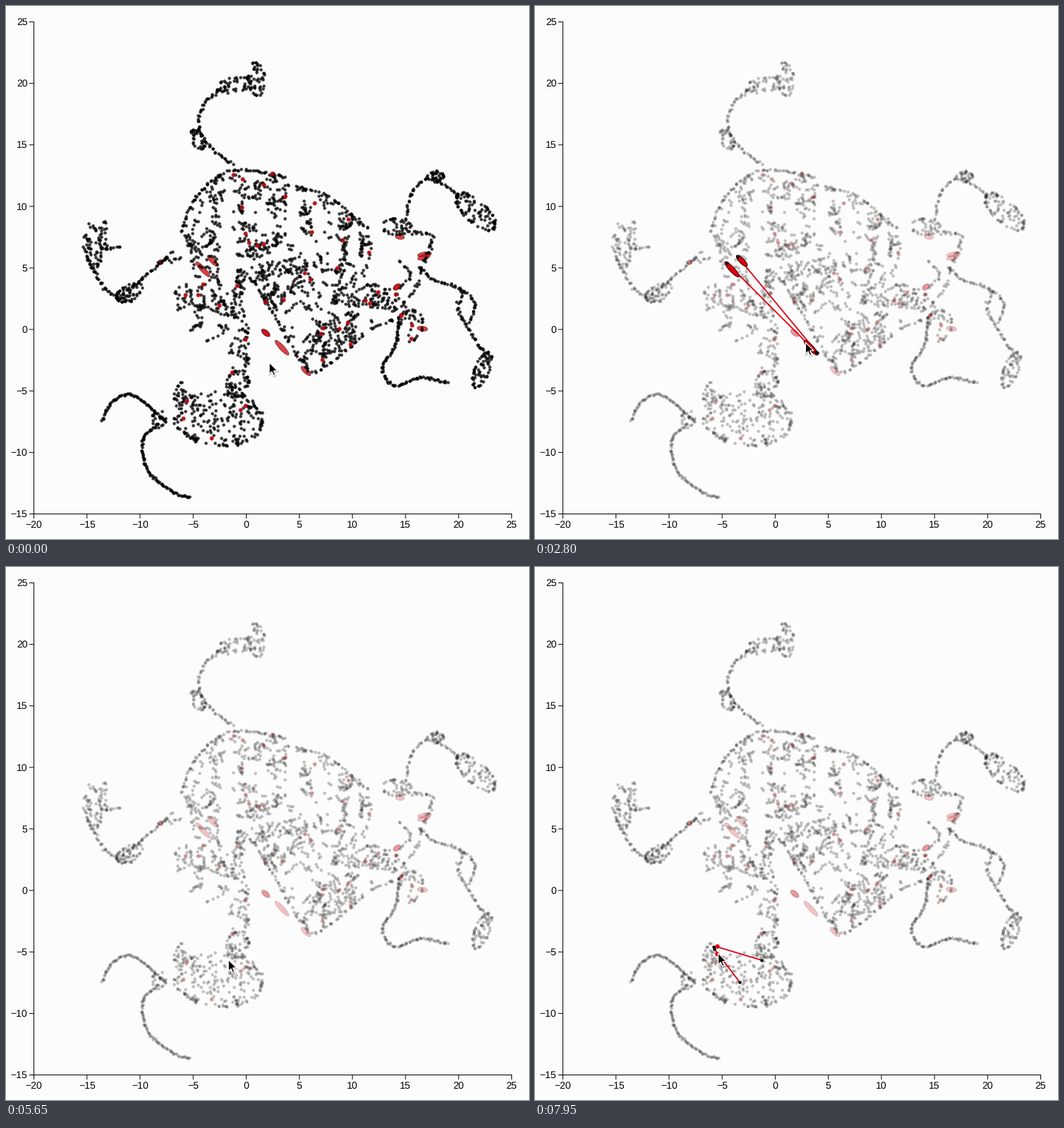
A matplotlib script that plays this animation: 741x755 px, repeating every 8000 ms.

```python
import numpy as np
import matplotlib.pyplot as plt
from matplotlib.animation import FuncAnimation
from matplotlib.patches import Ellipse, Polygon
from matplotlib.path import Path

W, H, DPI = 741, 755, 64
STEP, LOOP = 50, 8000
PX = 72 / DPI
RED, HOT = "#d00c12", "#dc0010"
rng = np.random.default_rng(5)
plt.rcParams.update({"font.family": "Liberation Sans", "text.hinting": "none"})

fig = plt.figure(figsize=(W / DPI, H / DPI), dpi=DPI, facecolor="#fcfcfc")
ax = fig.add_axes([0, 0, 1, 1])
ax.set(xlim=(0, W), ylim=(H, 0))
ax.axis("off")


# point cloud
def smooth(pts, n=16):
    """Catmull-Rom curve through the key points."""
    p = np.array(pts, float)
    q = np.vstack([2 * p[0] - p[1], p, 2 * p[-1] - p[-2]])
    u = np.linspace(0, 1, n)[:, None]
    return np.vstack([
        b + u / 2 * (c - a + u * (2 * a - 5 * b + 4 * c - d + u * (3 * (b - c) + d - a)))
        for a, b, c, d in zip(q, q[1:], q[2:], q[3:])])


def strand(*pts, gap=2.6, spread=0.9):
    """Dots strung along a curve."""
    p = smooth(pts)
    s = np.r_[0, np.cumsum(np.hypot(*np.diff(p, axis=0).T))]
    u = np.arange(0, s[-1], gap)
    u = np.clip(u + rng.normal(0, gap * 0.6, len(u)), 0, s[-1])
    xy = np.c_[np.interp(u, s, p[:, 0]), np.interp(u, s, p[:, 1])]
    return list(xy + rng.normal(0, spread, xy.shape))


def blob(n, cx, cy, rx, ry, tilt=0, rim=0.4):
    """Dots in a tilted ellipse, a share of them on its rim."""
    a = rng.uniform(0, 2 * np.pi, n)
    r = np.where(rng.random(n) < rim, rng.normal(1, 0.03, n), np.sqrt(rng.random(n)))
    z = (rx * r * np.cos(a) + 1j * ry * r * np.sin(a)) * np.exp(1j * np.radians(tilt))
    return list(np.c_[cx + z.real, cy + z.imag])


def chains(n, outline, holes):
    """Short wandering chains that fill an outline but keep out of the holes."""
    area, lo, hi = Path(outline), outline.min(0), outline.max(0)

    def inside(p):
        return area.contains_point(p) and all(
            ((p[0] - x) / rx) ** 2 + ((p[1] - y) / ry) ** 2 > 1 for x, y, rx, ry in holes)

    out = []
    while len(out) < n:
        p, a = rng.uniform(lo, hi), rng.uniform(0, 2 * np.pi)
        for _ in range(rng.integers(1, 6)):
            if inside(p):
                out.append(p)
            p = p + rng.uniform(2.5, 5.5) * np.array([np.cos(a), np.sin(a)])
            a += rng.normal(0, 0.7)
    return out


back = [(248, 318), (270, 269), (318, 233), (393, 240)]
shoulder = [(410, 254), (462, 273), (516, 319)]
keel = [(345, 384), (381, 440), (428, 515), (470, 497), (506, 465)]
leg = [(341, 380), (331, 420), (340, 465), (341, 516)]
flank = [(321, 520), (308, 470), (272, 474), (236, 410), (263, 384), (259, 345)]
edge = back + shoulder + [(515, 383), (550, 412)] + keel[::-1] + leg + flank
holes = [(314, 365, 14, 40), (283, 300, 8, 14), (313, 303, 8, 24), (362, 297, 9, 26),
         (405, 290, 9, 38), (443, 302, 12, 18), (492, 345, 9, 20)]

body = chains(1270, smooth(edge), holes)
body += strand(*back, gap=3.2) + strand(*shoulder, gap=4) + strand(*keel, gap=4)
body += strand(*leg, gap=4, spread=1.8)
belly = blob(225, 301, 584, 61, 38, 4, rim=0.36) + blob(56, 328, 536, 16, 20)
belly += blob(26, 247, 552, 9, 19)
elbow = blob(40, 548, 418, 26, 12, 38, 0.2) + blob(38, 572, 452, 18, 22, 10)

arms = [
    # top
    strand((321, 225), (287, 197), (272, 166), (282, 136), (304, 119)),
    blob(34, 271, 189, 9, 15, -30), blob(48, 322, 112, 25, 11, -12),
    blob(46, 355, 104, 12, 24, -10),
    # left
    strand((115, 355), (140, 400), (178, 419)),
    strand((165, 408), (205, 375), (235, 349)),
    strand((222, 361), (250, 356), gap=4, spread=1.6),
    strand((140, 345), (164, 339), gap=3.5),
    blob(54, 122, 340, 12, 30, -8), blob(24, 138, 325, 7, 20), blob(52, 174, 405, 20, 11, -30),
    # upper right
    strand((566, 300), (576, 262), (600, 245), (640, 265), gap=3),
    blob(34, 608, 241, 12, 8), blob(98, 665, 291, 35, 15, 42, 0.5),
    blob(42, 553, 312, 21, 11), strand((572, 320), (603, 327), (588, 372), spread=1.6),
    # right
    strand((588, 372), (608, 389), (645, 402), (641, 430), (666, 475), (685, 496)),
    strand((645, 402), (664, 420), (657, 448)), blob(60, 674, 515, 10, 27, 22),
    strand((557, 362), (573, 380), (557, 400), gap=3.5),
    strand((588, 372), (582, 396), (560, 424), gap=4.2),
    # lower right
    strand((514, 457), (556, 441), gap=4),
    strand((556, 440), (552, 478), (533, 512), (550, 537), (588, 526), (626, 533), gap=2),
    # tails
    strand((136, 587), (150, 561), (180, 551), (228, 590), gap=1.9, spread=0.6),
    strand((260, 696), (238, 689), (202, 660), (193, 615), (214, 592), gap=1.9, spread=0.6),
    blob(18, 216, 585, 10, 12),
]
dots = body + belly + elbow + sum(arms, [])
reds = np.vstack([rng.choice(body, 34, replace=False), rng.choice(belly, 6),
                  rng.choice(elbow, 6)])

# x, y, length, tilt of the stretched red groups
streaks = [(279, 373, 29, 47), (293, 361, 21, 46), (391, 484, 28, 47), (368, 463, 15, 40),
           (368, 463, 12, 40), (425, 517, 18, 43), (593, 352, 20, -8), (592, 356, 18, -15),
           (554, 398, 12, -35), (554, 398, 11, -35), (558, 327, 13, 8), (590, 457, 15, 8),
           (219, 363, 7, 0), (219, 363, 6, 0)]


def streak(x, y, size, tilt, **kw):
    return ax.add_patch(Ellipse((x, y), size, min(size, 7), angle=tilt, **kw))


def spots(xy, r, color, **kw):
    x, y = np.transpose(xy)
    return ax.plot(x, y, "o", ms=2 * r * PX, mfc=color, mec="none", **kw)[0]


def line(*pts, color="black", lw=1, **kw):
    return ax.plot(*np.transpose(pts), color=color, lw=lw * PX, snap=False, **kw)[0]


cloud = [spots(dots, 2.25, "black"), spots(reds, 3.1, RED)]
cloud += [streak(*s, fc=RED, ec="#400", lw=0.6 * PX) for s in streaks]

# axes
X0, Y0, X1, Y1 = 39.5, 719.5, 716.5, 22.5
line((X0, Y1), (X0, Y0), (X1, Y0))
for v in range(-20, 26, 5):
    x = X0 + (v + 20) / 45 * (X1 - X0)
    y = Y0 + (v + 15) / 40 * (Y1 - Y0)
    name = str(v).replace("-", "\u2212")
    line((x, Y0), (x, Y0 + 6))
    ax.text(x, Y0 + 19.1, name, size=14 * PX, ha="center")
    if v >= -15:
        line((X0 - 6, y), (X0, y))
        ax.text(X0 - 9, y + 4.6, name, size=14 * PX, ha="right")


# hovered groups
def highlight(on, off, links, hubs=(), groups=()):
    parts = [line(*l, color=HOT, lw=1.8, zorder=4) for l in links]
    parts += [streak(*g, fc=HOT, ec="#300", lw=PX, zorder=4) for g in groups]
    parts.append(spots([p for l in links for p in (l[0], l[-1])], 2.2, "black", zorder=5))
    if hubs:
        parts.append(spots(hubs, 3.1, HOT, zorder=5))
    return on, off, parts


hovers = [
    highlight(2450, 3850, [[(272, 364), (398, 490)], [(287, 355), (400, 491)]],
              groups=streaks[:3]),
    highlight(4550, 5100, [[(341.5, 505), (341, 543), (337, 558)]], [(346, 543)]),
    highlight(6000, 6800, [[(309, 542), (305, 550)], [(314.5, 554), (310, 584)]],
              [(305, 550), (312, 578)]),
    highlight(7800, LOOP, [[(253, 538), (258, 538), (321, 557)], [(254, 541), (290, 588)]],
              [(258, 537), (258, 548)]),
]

arrow = np.array([(0, 0), (0, 16.2), (3.7, 12.8), (6.1, 18.6), (8.7, 17.5), (6.3, 11.8),
                  (11.4, 11.4)])
shadow = ax.add_patch(Polygon(arrow, fc="black", ec="black", lw=2.5 * PX, alpha=0.14, zorder=8))
cursor = ax.add_patch(Polygon(arrow, fc="black", ec="white", lw=1.3 * PX, zorder=9))

# time, x, y of the pointer's stops
stops = np.array([(0, 373, 505), (800, 636, 711), (1550, 383, 508), (2500, 381, 473),
                  (3750, 397, 498), (4700, 341.5, 543), (6200, 303.5, 562),
                  (6450, 303.5, 563), (7450, 283, 576), (7900, 259.5, 547)])


def pointer(t):
    k, u = divmod(np.interp(t, stops[:, 0], range(len(stops))), 1)
    a, b = stops[int(k)], stops[min(int(k) + 1, len(stops) - 1)]
    return (a + (b - a) * u * u * (3 - 2 * u))[1:]


def draw(i):
    t = i * STEP
    fade = np.clip((t - 850) / 400, 0, 1)
    for part in cloud:
        part.set_alpha(0.78 - 0.54 * fade)
    for on, off, parts in hovers:
        for part in parts:
            part.set_visible(on <= t < off)
    tip = pointer(t)
    cursor.set_xy(arrow + tip)
    shadow.set_xy(arrow + tip + (0.5, 1.5))
    for part in (cursor, shadow):
        part.set_visible(not 850 <= t < 1550)
    return [cursor, shadow]


anim = FuncAnimation(fig, draw, frames=LOOP // STEP, interval=STEP, repeat=True,
                     repeat_delay=0, blit=False)
plt.show()
```
